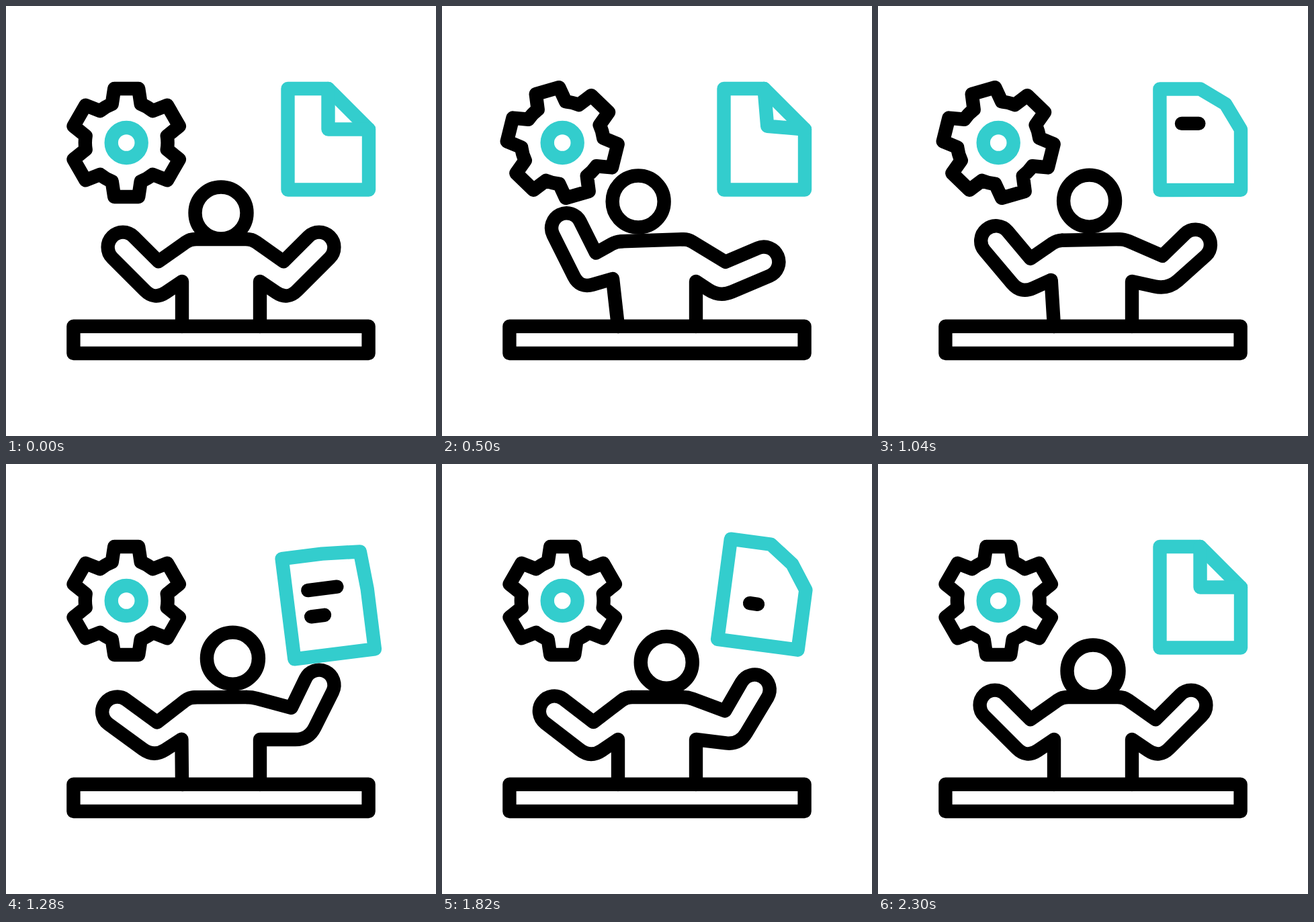
Write an HTML page that moves like this. It is 640 px wide and 640 px high and loops after 2.4 s.

```html
<!DOCTYPE html>
<html lang="en">
<head>
<meta charset="utf-8">
<title>Multitasking</title>
<style>
  html, body { margin: 0; width: 100%; height: 100%; overflow: hidden; background: #fff; }
  svg { display: block; width: 100vw; height: 100vh; }
  svg * { fill: none; stroke-width: 20.4; stroke-linecap: round; stroke-linejoin: round; }
  .ink { stroke: #000; }
  .teal { stroke: #33cdcd; }
</style>
</head>
<body>
<svg viewBox="0 0 640 640">
  <path id="gear" class="ink"/>
  <circle class="teal" cx="179.2" cy="203.5" r="22.5"/>
  <g id="doc">
    <path id="sheet" class="teal"/>
    <path id="fold" class="teal"/>
    <path id="lines" class="ink"/>
  </g>
  <circle id="head" class="ink" r="38.5"/>
  <path id="left" class="ink"/>
  <path id="right" class="ink" transform="translate(640) scale(-1 1)"/>
  <path id="chest" class="ink"/>
  <rect class="ink" x="100.4" y="476.8" width="439.2" height="40.2"/>
</svg>
<script>
const LOOP = 2400, LAST = 2300, STEP = 20;
const HAND = 22.4;
const $ = id => document.getElementById(id);
const set = (id, name, value) => $(id).setAttribute(name, value);
const mix = (a, b, k) => Array.isArray(a) ? a.map((v, i) => mix(v, b[i], k)) : a + (b - a) * k;
const clamp = k => Math.min(1, Math.max(0, k));

// Eased progress from 0 to 1 between two times
function ease(t, from, to) {
  const k = clamp((t - from) / (to - from));
  return k * k * (3 - 2 * k);
}

// Forearm from hand position and angle, with the lengths of its inner and outer edge
function arm(x, y, degrees, { inner = 52.5, outer = 89, armpit = [262, 410], shoulder = [274, 347] } = {}) {
  const a = degrees * Math.PI / 180, c = Math.cos(a), s = Math.sin(a);
  const edge = (along, side) => [x + along * c - side * s, y + along * s + side * c];
  return { points: [armpit, edge(outer, HAND), [x, y], edge(inner, -HAND), shoulder] };
}

// Head and both arms; the right arm is given mirrored
const pose = (head, left, right) => [head, left.points, right.points];
const rest = arm(174, 359, 45);
const neutral = pose([320, 308], rest, rest);
const leanLeft = pose([292, 291],
  arm(185.5, 330.5, 63.5, { armpit: [254, 406], shoulder: [259.5, 350.5] }),
  arm(161, 381, 23, { outer: 81 }));
const leanRight = pose([341, 289],
  arm(164, 372, 34, { inner: 58, outer: 84 }),
  arm(175, 325, 66.7, { inner: 49.3, outer: 81 }));

// Point k pixels from p on the way to q
const toward = (p, q, k) => mix(p, q, k / Math.hypot(q[0] - p[0], q[1] - p[1]));

function armPath([armpit, elbow, hand, crook, shoulder], end) {
  const dx = crook[0] - hand[0], dy = crook[1] - hand[1];
  const a = Math.atan2(dy, dx) + Math.asin(HAND / Math.hypot(dx, dy));
  const nx = HAND * Math.sin(a), ny = -HAND * Math.cos(a);
  const low = [hand[0] - nx, hand[1] - ny], high = [hand[0] + nx, hand[1] + ny];
  return `M262 477L${armpit}L${toward(elbow, armpit, 20)}Q${elbow} ${toward(elbow, low, 20)}` +
    `L${low}A${HAND} ${HAND} 0 0 1 ${high}L${crook}L${toward(shoulder, crook, 8)}Q${shoulder} ${end}`;
}

function drawBody(t) {
  const active = ease(t, 0, 520) - ease(t, 1600, 2180);
  const lean = mix(leanLeft, leanRight, ease(t, 725, 1390));
  const [head, left, right] = mix(neutral, lean, active);
  const flip = ([x, y]) => [640 - x, y];
  const ls = left[4], rs = flip(right[4]);
  const a = toward(ls, rs, 8), b = toward(rs, ls, 8);
  set('left', 'd', armPath(left, a));
  set('right', 'd', armPath(right, flip(b)));
  set('chest', 'd', `M${a}L${b}`);
  set('head', 'cx', head[0]);
  set('head', 'cy', head[1]);
}

function linePath(t, i) {
  const x = 452, y = 174.5 + 39.5 * i, length = i ? 20 : 43.5;
  const drawn = 940 + 150 * i, wiped = 1585 + 170 * i;
  const a = length * ease(t, wiped, wiped + 150), b = length * ease(t, drawn, drawn + 180);
  return b - a > 0.1 ? `M${x + a} ${y}H${x + b}` : '';
}

function drawDoc(t) {
  // The corner folds onto the sheet at 1 and opens out in full at -1
  const folded = 30.25 * (1 - ease(t, 400, 800) + ease(t, 1960, 2310));
  const opened = 30.25 * (ease(t, 865, 1400) - ease(t, 1430, 1960));
  const x = 509.75, y = 153.25;
  set('sheet', 'd', `M419.5 123H479.5L${x + opened} ${y - opened}L540 183.5V273.5H419.5Z`);
  set('fold', 'd', folded > 0.01 ? `M479.5 123L${x - folded} ${y + folded}L540 183.5` : '');
  set('lines', 'd', linePath(t, 0) + linePath(t, 1));

  const lift = 12 * ease(t, 1000, 1380) - 19.5 * ease(t, 1380, 1660) + 7.5 * ease(t, 1660, 2000);
  const tilt = 8.8 * (2 * ease(t, 1380, 1660) - ease(t, 1020, 1380) - ease(t, 1720, 2140));
  set('doc', 'transform', `translate(0 ${lift}) rotate(${tilt} 479.75 198.25)`);
}

function gearPath() {
  const turn = (x, y, a) => [x * Math.cos(a) - y * Math.sin(a), x * Math.sin(a) + y * Math.cos(a)];
  let d = '';
  for (let i = 0; i < 6; i++) {
    const p = (x, y) => turn(x, y, i * Math.PI / 3);
    d += (i ? 'A62 62 0 0 1 ' : 'M') +
      `${p(-21.5, -57.5)}L${p(-18, -80.5)}L${p(18, -80.5)}L${p(21.5, -57.5)}`;
  }
  return d + 'A62 62 0 0 1 -21.5 -57.5Z';
}

function draw(t) {
  const spin = 360 * clamp((t - 188) / 1080);
  set('gear', 'transform', `translate(179.2 203.5) rotate(${spin})`);
  drawDoc(t);
  drawBody(t);
}

set('gear', 'd', gearPath());
const start = performance.now();
function tick() {
  const t = (performance.now() - start) % LOOP;
  draw(Math.min(Math.floor(t / STEP) * STEP, LAST));
  requestAnimationFrame(tick);
}
tick();
</script>
</body>
</html>
```
